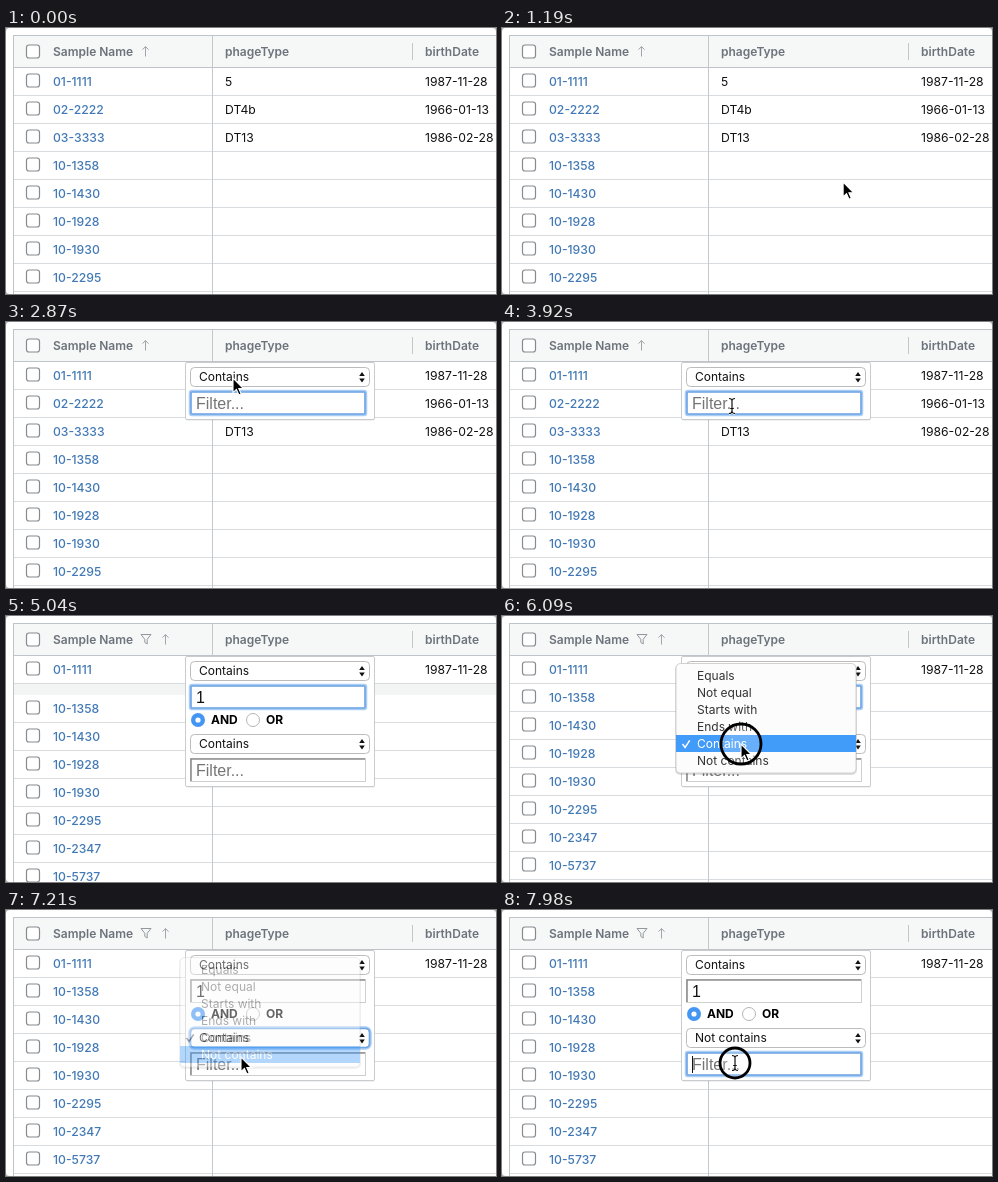
An HTML page for the animation above (8000 ms loop, 490 by 266 pixels).

```html
<!DOCTYPE html>
<html lang="en">
<head>
<meta charset="utf-8">
<title>Column filter</title>
<style>
  html, body { margin: 0; width: 100%; height: 100%; overflow: hidden; background: #fff; }
  svg { display: block; width: 490px; height: 266px; font: 12px Inter, "Open Sans", sans-serif; }
  .head { font-weight: 600; fill: #6c737b; }
  .link { font-weight: 500; fill: #4279b5; font-size: 12.2px; }
  .cell { font-size: 12.2px; fill: #111; }
  .input { font: 16px "Liberation Sans", Arial, sans-serif; fill: #111; }
  .hint { fill: #757575; }
  .bold { font-weight: 700; }
</style>
</head>
<body>
<svg id="stage" viewBox="0 0 490 266" xmlns="http://www.w3.org/2000/svg"></svg>
<script>
const stage = document.getElementById('stage');
const LOOP = 8000, TICK = 70, ROW = 28;
const FILTERED = 4900, MENU_OPEN = 6090, CHOSEN = 7280;

const samples = [
  ['01-1111', '5', '1987-11-28'], ['02-2222', 'DT4b', '1966-01-13'], ['03-3333', 'DT13', '1986-02-28'],
  ['10-1358'], ['10-1430'], ['10-1928'], ['10-1930'], ['10-2295'], ['10-2347'], ['10-5737'], ['10-5740']
];
const options = ['Equals', 'Not equal', 'Starts with', 'Ends with', 'Contains', 'Not contains'];

// Pointer stops: time, x, y
const path = [
  [770, 478, 236], [1540, 237, 92], [1750, 186, 25], [1890, 186, 25], [1960, 185, 21],
  [2380, 185, 21], [2870, 227, 56], [3010, 227, 56], [3360, 230, 82], [3640, 230, 82], [3920, 230, 84],
  [5110, 230, 84], [5600, 238, 124], [5740, 238, 124], [5810, 239, 128],
  [6510, 239, 128], [6930, 235, 147], [7630, 235, 147], [7770, 233, 153]
];
// Presses: time, x, y, ring radii per tick
const presses = [
  [2170, 185, 22, [20]], [6090, 239, 128, [20, 15]], [7000, 235, 147, [20, 15]], [7910, 233, 153, [20, 15]]
];

const within = (t, from, to) => t >= from && t < to;
const ease = p => p * p * (3 - 2 * p);

const text = (x, y, s, cls = 'cell', extra = '') => `<text x="${x}" y="${y}" class="${cls}" ${extra}>${s}</text>`;
const rect = (x, y, w, h, fill, extra = '') =>
  `<rect x="${x}" y="${y}" width="${w}" height="${h}" fill="${fill}" ${extra}/>`;
const shape = (d, fill, stroke = 'none', width = 1) =>
  `<path d="${d}" fill="${fill}" stroke="${stroke}" stroke-width="${width}"/>`;
const checkbox = y => rect(20.5, y - 6.5, 13, 13, '#fff', 'rx="2.5" stroke="#858b90" stroke-width="1.2"');

function header(t) {
  const filtered = t >= FILTERED, hover = within(t, 1680, 2590);
  const x = filtered ? 159.5 : 139.5;
  let s = rect(7, 8, 483, 31, '#f6f7f7') + checkbox(23.5);
  s += text(47, 27.5, 'Sample Name', 'head') + text(219, 27.5, 'phageType', 'head') + text(419, 27.5, 'birthDate', 'head');
  s += shape(`M${x} 28.5V18.5m-3 3.2l3 -3.2l3 3.2`, 'none', hover ? '#858b92' : '#a0a6ab');
  if (filtered) s += shape('M135 18.5h10l-3.8 4.8v4.7l-2.4 -1.6v-3.1z', 'none', '#92989e');
  if (hover) s += shape('M182 20.5h10M182 23.5h10M182 26.5h10', 'none', '#a3a8ad');
  return s + shape('M406.5 15v17', 'none', '#c3c7ca') + shape('M7 39.5H490M7 7.5H490', 'none', '#bfc4c8');
}

function row([name, type, date], top) {
  let s = rect(7, top, 483, ROW, '#fff') + shape(`M7 ${top + 27.5}H490`, 'none', '#d9dcde');
  s += checkbox(top + 12.5) + text(47, top + 18, name, 'link');
  if (type) s += text(219, top + 18, type) + text(419, top + 18, date);
  return s;
}

function grid(t) {
  const p = Math.min(1, Math.max(0, (t - FILTERED + 25) / 400));
  const shift = t >= FILTERED ? 2 * ROW * (1 - (1 - p) ** 3) : 0;
  let s = rect(7, 40, 483, 226, '#f3f4f4');
  samples.forEach((sample, i) => {
    if (t >= FILTERED && (i === 1 || i === 2)) return;
    s += row(sample, 40 + i * ROW - (i > 2 ? Math.round(shift) : 0));
  });
  return s + header(t) + shape('M7.5 8V266', 'none', '#bfc4c8') + shape('M206.5 8V266', 'none', '#c3c8cb');
}

const focusRing = (x, y, w, h, r) =>
  rect(x - 1, y - 1, w + 2, h + 2, 'none', `rx="${r + 1}" stroke="#a9cdf5" stroke-width="2.5"`) +
  rect(x, y, w, h, 'none', `rx="${r}" stroke="#6ea5e4" stroke-width="1.6"`);

function select(y, label, focused) {
  return rect(184.5, y + .5, 179, 19, '#fff', 'rx="4" stroke="#bcbcbc"') +
    (focused ? focusRing(184.5, y + .5, 179, 19, 4) : '') +
    text(193, y + 14.3, label, 'cell', 'style="font-size:12px"') +
    shape(`M353.2 ${y + 9}l2.8 -4l2.8 4zM353.2 ${y + 11.5}l2.8 4l2.8 -4z`, '#111');
}

function input(y, value, focused, caret) {
  let s = rect(184.5, y + .5, 175, 23, '#fff', 'stroke="#cfcfcf"');
  s += focused ? focusRing(185, y + 1, 174, 22, 1) : shape(`M185 ${y + 23}V${y + 1}H359`, 'none', '#8e8e8e', 1.6);
  s += value ? text(190, y + 18, value, 'input') : text(190, y + 18, 'Filter...', 'input hint');
  if (caret) s += rect(value ? 199 : 190, y + 4, 1, 17, '#111');
  return s;
}

function popup(t) {
  if (t < 2310) return '';
  const open = t >= FILTERED, height = open ? 130 : 57;
  const caret = within(t, 2310, 2800) || within(t, 3290, 3780) || within(t, 5810, 6090);
  let s = rect(180, 42, 189, height, '#000', 'opacity=".06" rx="2"');
  s += rect(179.5, 40.5, 189, height, '#fff', 'stroke="#c9cccf" rx="1.5"');
  s += select(45, 'Contains') + input(69, t >= 4200 ? '1' : '', t < 6230, caret);
  if (!open) return s;
  s += '<circle cx="192" cy="104" r="7" fill="#4596f3"/><circle cx="192" cy="104" r="2.6" fill="#fff"/>';
  s += '<circle cx="247" cy="104" r="6.5" fill="#fff" stroke="#b5b5b5"/>';
  s += text(205, 108.3, 'AND', 'bold') + text(260, 108.3, 'OR', 'bold');
  s += select(118, t >= CHOSEN ? 'Not contains' : 'Contains', within(t, 6230, 7910));
  return s + input(142, '', t >= 7910, t >= 7910);
}

function menu(t) {
  if (!within(t, MENU_OPEN, 7350)) return '';
  const opacity = t < 7140 ? 1 : Math.max(0, .7 - (t - 7140) / 70 * .3);
  const active = pointer(t)[1] < 136 ? 4 : 5;
  let s = rect(173, 48, 182, 111, '#000', 'rx="5" opacity=".13"');
  s += rect(174, 47.5, 180, 109.5, '#fcfcfc', 'rx="4.5" stroke="#c6c6c6" stroke-width=".8"');
  s += rect(174, 119 + (active - 4) * 17, 180, 17, '#419bf9');
  options.forEach((label, i) => {
    s += text(195, 64 + i * 17, label, '', `fill="${i === active ? '#fff' : '#333'}"`);
  });
  s += shape('M180.5 128l2.6 3.4l4.6 -7', 'none', active === 4 ? '#fff' : '#333', 1.5);
  return `<g opacity="${opacity}">${s}</g>`;
}

function pointer(t) {
  const i = path.findIndex(stop => stop[0] > t);
  if (i < 0) return path[path.length - 1].slice(1);
  if (i === 0) return path[0].slice(1);
  const [t0, x0, y0] = path[i - 1], [t1, x1, y1] = path[i];
  const p = ease((t - t0) / (t1 - t0));
  return [x0 + (x1 - x0) * p, y0 + (y1 - y0) * p];
}

function cursor(t) {
  if (t < 770 || within(t, 4270, 5180)) return '';
  const [x, y] = pointer(t);
  const overInput = (t > 2310 && t < MENU_OPEN && within(y, 69, 93)) || t >= 7700;
  let s = '';
  for (const [start, cx, cy, radii] of presses) {
    const r = radii[Math.floor((t - start) / TICK)];
    if (r) s += `<circle cx="${cx}" cy="${cy}" r="${r}" fill="#fff" fill-opacity=".2" stroke="#000" stroke-width="2.8"/>`;
  }
  if (overInput) {
    const beam = 'M-3 -7.5q3 0 3 2.5v10q0 2.5 -3 2.5M3 -7.5q-3 0 -3 2.5M3 7.5q-3 0 -3 -2.5M-1.8 2.5h3.6';
    s += `<g transform="translate(${x} ${y})">${shape(beam, 'none', '#fff', 2.6)}${shape(beam, 'none', '#111', 1.2)}</g>`;
  } else {
    const arrow = 'M0 0V14.6L3.4 11.4L5.9 17L8.2 16L5.8 10.5H10.4Z';
    s += `<g transform="translate(${x} ${y})">${shape(arrow, '#000', '#fff', 1.1)}</g>`;
  }
  return s;
}

function render(t) {
  stage.innerHTML = rect(0, 0, 490, 266, '#b9b9b9') + rect(0, 0, 490, 266, '#fff', 'rx="4"') +
    grid(t) + popup(t) + menu(t) + cursor(t);
}

let shown = -1;
function frame() {
  const t = Math.floor((performance.now() % LOOP) / TICK) * TICK;
  if (t !== shown) render(shown = t);
  requestAnimationFrame(frame);
}
frame();
</script>
</body>
</html>
```
